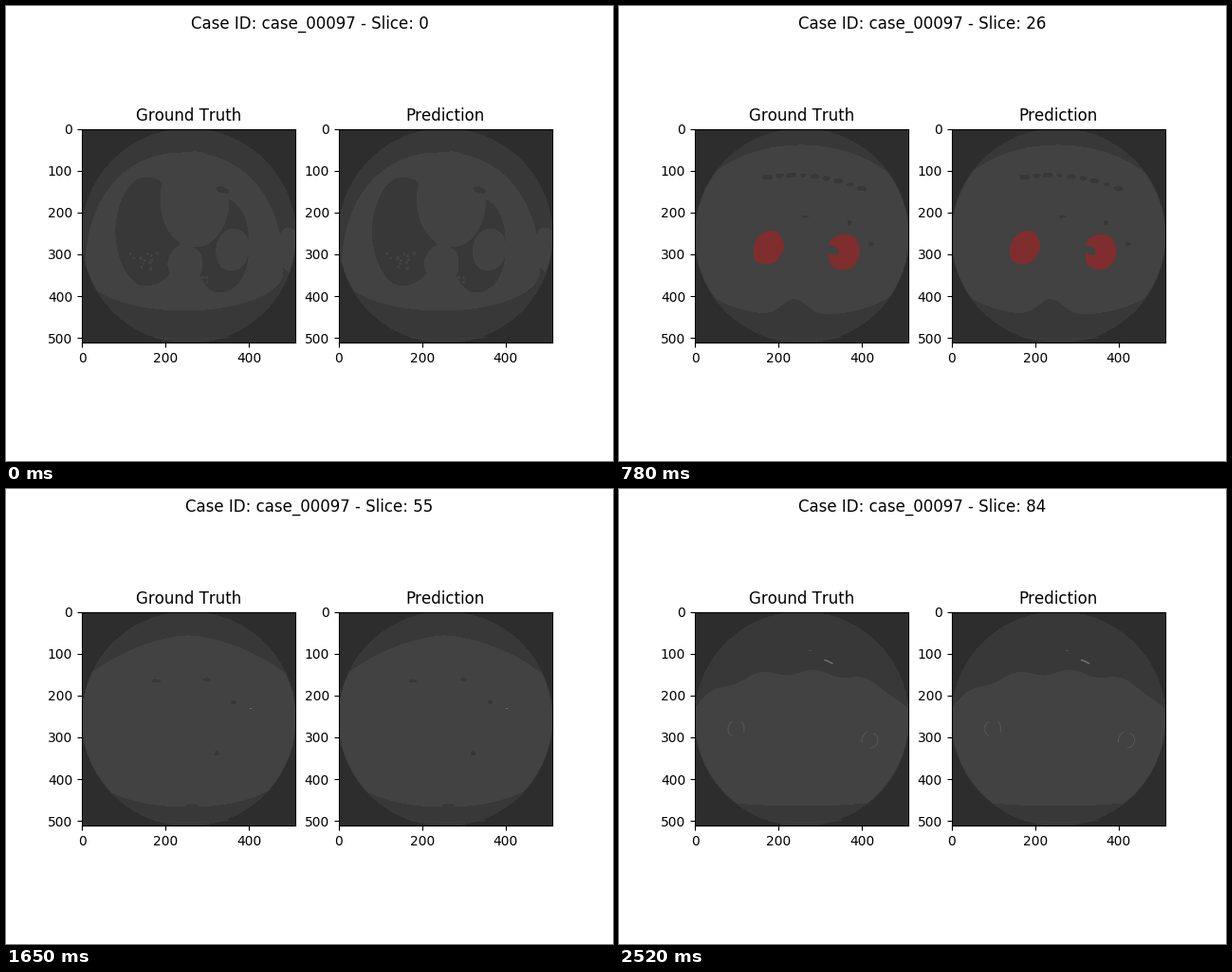
These frames come from a looping animation (640 by 480 pixels, 2550 ms). A matplotlib script:

```python
import numpy as np
import matplotlib.pyplot as plt
from matplotlib.animation import FuncAnimation
from matplotlib.patches import Circle, Polygon

SLICES = 85
STEP_MS = 30
AIR, FAT, TISSUE, BONE = "#2d2d2d", "#383838", "#424242", "#585858"
KIDNEY, TUMOR = "#802d2d", "#2d2d80"

plt.rcParams["font.family"] = "DejaVu Sans"
plt.rcParams["text.kerning_factor"] = 6

TURN = np.linspace(0, 2 * np.pi, 200, endpoint=False)

# Body contour: two superellipse halves joined at the height `mid`.
BODY_KEYS = [0, 18, 26, 35, 55, 67, 84]
BODY = dict(
    x=[188, 191.5, 192, 192, 192, 192, 192],
    half=[104, 109, 125, 135, 135, 135, 135],
    top=[155, 147, 147, 147, 155, 168, 194],
    mid=[280, 245, 240, 240, 240, 291, 312],
    bottom=[321, 325, 326, 333, 335, 335, 334],
    top_power=[2.2, 2.3, 2, 1.7, 1.6, 1.6, 2.5],
    bottom_power=[2, 3, 2.5, 2.6, 2.2, 2.3, 2],
    notch=[0, 12, 18, 23, 0, 0, 0],
    notch_width=[22, 22, 18, 13, 13, 13, 13],
    ripple=[0, 0, 0, 0, 0, 0, 3],
)


def to_image(x, y):
    """Stage pixels of the left panel -> coordinates of the 512 px scan."""
    scale = 512 / 225.45
    return np.column_stack([(x - 80) * scale, (y - 129.7) * scale]) - 0.5


def signed_pow(v, p):
    return np.sign(v) * np.abs(v) ** p


def body_outline(s):
    b = {name: np.interp(s, BODY_KEYS, v) for name, v in BODY.items()}
    c, d = np.cos(TURN), np.sin(TURN)
    lower = d > 0
    power = 2 / np.where(lower, b["bottom_power"], b["top_power"])
    height = np.where(lower, b["bottom"] - b["mid"], b["mid"] - b["top"])
    x = b["x"] + b["half"] * signed_pow(c, power)
    y = b["mid"] + height * signed_pow(d, power)
    notch = b["notch"] * np.exp(-((x - 185) / b["notch_width"]) ** 2)
    ripple = b["ripple"] * np.cos(2 * np.pi * (x - 150) / 55) * np.abs(d)
    return to_image(x, y - np.where(lower, notch, ripple))


def oval(x, y, rx, ry, tilt=0, rough=0.0, seed=0):
    """Ellipse, tilted clockwise in degrees, with an optional uneven rim."""
    rng = np.random.default_rng(seed)
    rim = 1 + rough * sum(rng.uniform(-1, 1) * np.cos(k * TURN + k * seed)
                          for k in (3, 4, 5))
    u, v = rx * rim * np.cos(TURN), ry * rim * np.sin(TURN)
    t = np.radians(tilt)
    return to_image(x + u * np.cos(t) - v * np.sin(t),
                    y + u * np.sin(t) + v * np.cos(t))


class Blob:
    """Oval (x, y, rx, ry, tilt) moving between key slices."""

    def __init__(self, color, rough, keys):
        self.color, self.rough = color, rough
        self.when = list(keys)
        self.poses = np.array(list(keys.values()), float)

    def at(self, s):
        if not self.when[0] <= s <= self.when[-1]:
            return None
        pose = [np.interp(s, self.when, col) for col in self.poses.T]
        return oval(*pose, rough=self.rough, seed=self.when[0])


belly = Blob(TISSUE, 0, {55: (200, 200, 70, 38, 0), 67: (201, 194, 84, 33, 0),
                         84: (195, 228, 70, 20, 0)})
arm = Blob(TISSUE, 0, {0: (300, 258, 12, 24, -8), 8: (314, 258, 3, 8, 0)})
left_lung = Blob(FAT, 0.01, {0: (150, 238, 34, 57, 0), 13: (136, 286, 3, 2, 0)})
right_lung = Blob(FAT, 0.01, {0: (227, 252, 29, 50, 0), 14: (246, 286, 3, 2, 0)})
heart = Blob(TISSUE, 0, {0: (199, 204, 36, 50, 0), 14: (199, 204, 36, 50, 0)})
spine = Blob(TISSUE, 0.03, {0: (189, 272, 18, 19, 0), 14: (189, 272, 18, 19, 0)})
spleen = Blob(TISSUE, 0.01, {0: (239, 257, 17, 22, 10), 14: (240, 262, 24, 30, 0)})
pleura = Blob(FAT, 0.1, {0: (228.5, 194, 6.5, 2.5, 20), 6: (230, 195, 1, 1, 0)})
chest = (left_lung, right_lung, heart, spine, spleen, pleura)

kidneys = (
    Blob(KIDNEY, 0.03, {12: (226, 267, 3, 3, -10), 18: (227.5, 267.5, 10.5, 15, -10),
                        26: (237, 259.5, 16, 18.5, 10), 35: (234.5, 252, 12, 15.5, -20),
                        45: (233, 246, 3, 3, -20)}),
    Blob(KIDNEY, 0.03, {20: (156, 254, 3, 3, 30), 26: (157.5, 255, 14.5, 18, 30),
                        35: (151, 244, 13, 20.5, 35), 46: (145, 238, 3, 3, 35)}),
)
hilum = Blob(TISSUE, 0.05, {22: (222, 259, 1, 1, 0), 26: (226, 258, 5.5, 4, 30),
                            31: (222, 259, 1, 1, 0)})
tumor = Blob(TUMOR, 0.06, {31: (152, 234, 2, 1.5, 0), 35: (150.5, 231.5, 7.5, 5, 0),
                           42: (145, 231, 2, 2, 0)})

# Gas pockets: (slice, x, y, rx, ry)
gas = [
    (18, 245, 209.5, 6, 5.5), (18, 266.5, 248, 2.5, 2),
    (26, 197, 222, 3, 1), (26, 243, 229, 2, 2), (26, 266, 251, 2.5, 1.5),
    (35, 264, 233, 6, 3.5), (35, 270, 248, 2, 1.7),
    (55, 158.5, 202.5, 4, 1.5), (55, 212, 201, 3, 1.3),
    (55, 240, 225, 2, 1.6), (55, 222, 279, 2, 2), (55, 196, 334, 6, 1.4),
]


def add_colon(at, x0, x1, crest, y, bend, count, widest, seed):
    """Row of pockets along a shallow arch."""
    rng = np.random.default_rng(seed)
    for x in np.linspace(x0, x1, count):
        rx = rng.uniform(2, widest)
        gas.append((at, x, y + bend * (x - crest) ** 2, rx, 0.3 * rx + 0.8))


add_colon(26, 157, 256, 185, 178.5, 0.0028, 9, 5, seed=4)
add_colon(35, 123, 257, 203, 188.5, 0.0033, 11, 7, seed=2)

rng = np.random.default_rng(7)
vessels = [(rng.normal(cx, sx), rng.normal(cy, 6), rng.uniform(0.6, 1.4))
           for cx, cy, sx, n in ((152, 269, 11, 12), (212, 286, 4, 4))
           for _ in range(n)]

# Pelvic bone rims: (x, y, rx, ry, start and end angle)
bones = [(120, 253, 5, 7, 100, 270), (125, 253, 7, 9, -55, 20),
         (264, 266, 8, 10, 175, 250), (265, 265, 8, 8, -60, 85)]

fig, axes = plt.subplots(1, 2, figsize=(6.4, 4.8), dpi=100)
heading = fig.suptitle("")
rings = {}
for ax, name in zip(axes, ("Ground Truth", "Prediction")):
    ax.set_title(name)
    ax.set_facecolor(AIR)
    ax.set_aspect("equal")
    ax.set(xlim=(-0.5, 511.5), ylim=(511.5, -0.5),
           xticks=range(0, 401, 200), yticks=range(0, 501, 100))
    rings[ax] = ax.add_patch(
        Circle((255.5, 255.5), 256, color=FAT, lw=0, antialiased=False))
    x = np.linspace(175, 350, 30)
    ax.plot(x, 503 - ((x - 262) / 88) ** 2 * 4, color="#3e3e3e", lw=0.8)

drawn = []


def fill(points, color, panels=axes):
    if points is None:
        return
    for ax in panels:
        patch = ax.add_patch(
            Polygon(points, facecolor=color, lw=0, antialiased=False))
        patch.set_clip_path(rings[ax])
        drawn.append(patch)


def stroke(x, y, color, width=0.7):
    for ax in axes:
        drawn.extend(ax.plot(*to_image(np.array(x), np.array(y)).T,
                             color=color, lw=width))


def draw(s):
    while drawn:
        drawn.pop().remove()
    heading.set_text(f"Case ID: case_00097 - Slice: {s}")

    fill(body_outline(s), TISSUE)
    for blob in (belly, arm, *chest):
        fill(blob.at(s), blob.color)
    if s < 9:
        for x, y, r in vessels:
            r *= 1 - s / 9
            fill(oval(x, y, r, r), TISSUE)

    for seed, (at, x, y, rx, ry) in enumerate(gas):
        size = 1 - abs(s - at) / 8
        if size > 0.15:
            fill(oval(x, y, rx * size, ry * size, rough=0.12, seed=seed), FAT)

    for blob in (*kidneys, hilum):
        fill(blob.at(s), blob.color)
    fill(tumor.at(s), TUMOR, axes[:1])

    if abs(s - 18) < 2:
        stroke([258, 260], [327.5, 327], "#707070")
    if abs(s - 55) < 2:
        stroke([256.5, 257.5], [231.5, 231.5], "#707070")
    if s >= 76:
        for x, y, rx, ry, start, end in bones:
            a = np.radians(np.linspace(start, end, 20))
            stroke(x + rx * np.cos(a), y + ry * np.sin(a), BONE,
                   0.7 * min(1, (s - 75) / 6))
    if s >= 81:
        stroke([217, 220, 225], [180.5, 181.5, 184], "#7c7c7c", 0.9)
        stroke([200, 202], [170.5, 170.5], "#505050")
    return drawn


anim = FuncAnimation(fig, draw, frames=SLICES, interval=STEP_MS,
                     init_func=lambda: [], repeat=True, repeat_delay=0)
plt.show()
```
